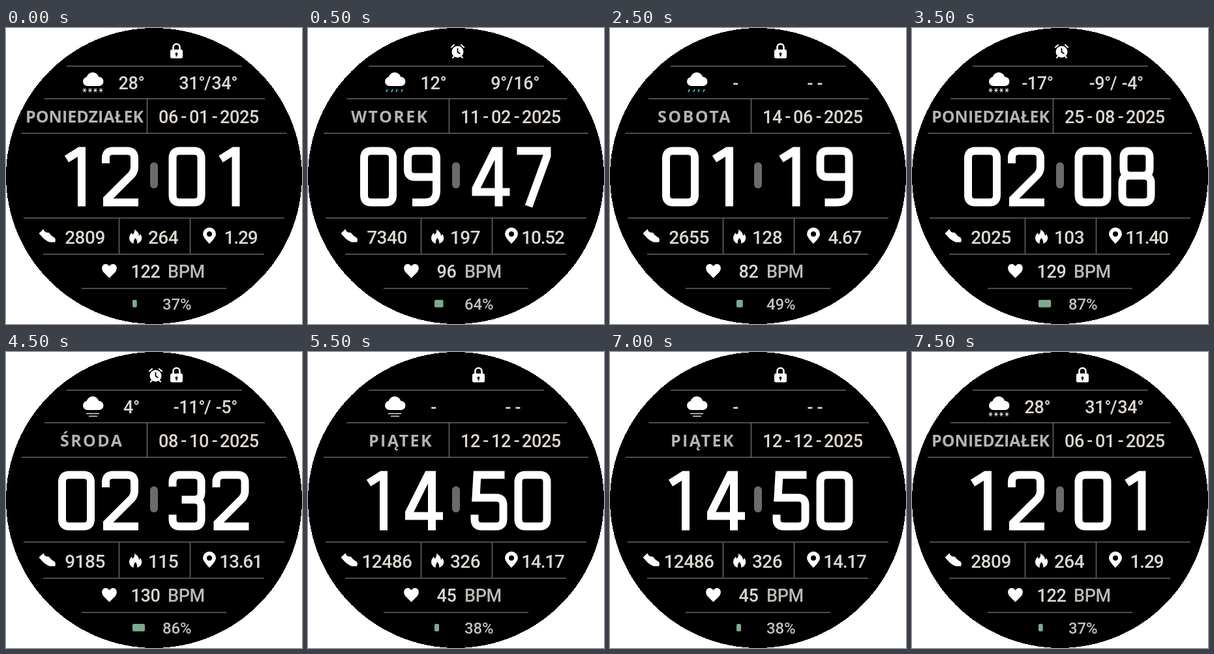
Write an HTML page that moves like this. It is 454 px wide and 454 px high and loops after 8000 ms.

```html
<!DOCTYPE html>
<html lang="pl">
<head>
<meta charset="utf-8">
<title>Watch face</title>
<style>
html, body { margin: 0; width: 100%; height: 100%; overflow: hidden; background: #fff; }
svg { display: block; width: 100vw; height: 100vh; }
text { font: 450 27px Roboto, sans-serif; letter-spacing: -.4px; fill: #ddd8d1; white-space: pre; }
#day { font: 700 25px "Open Sans", sans-serif; fill: #b4b4b4; }
.stat text { font-size: 28px; letter-spacing: -.5px; }
.stat #dist { letter-spacing: -1.2px; }
#unit { fill: #bdb9b4; }
#pct { font-size: 24px; letter-spacing: -.2px; fill: #c4c0bb; }
.mid { text-anchor: middle; }
.end { text-anchor: end; }
.icon { fill: #fff; }
.rules { fill: none; stroke: #666; stroke-width: 1.5; }
#clock { fill: none; stroke: #fff; stroke-width: 12; }
.dots { fill: url(#dots); stroke: #fff; stroke-dasharray: 1 1; mix-blend-mode: difference; }
</style>
</head>
<body>
<svg viewBox="0 0 454 454">
  <defs>
    <pattern id="dots" width="8" height="4" patternUnits="userSpaceOnUse">
      <path d="M1 1h1v1h-1zM5 3h1v1h-1z" fill="#fff"/>
    </pattern>
    <linearGradient id="warm" x1="0" y1="0" x2=".6" y2="1">
      <stop offset="0" stop-color="#f4452c"/>
      <stop offset="1" stop-color="#ff7a12"/>
    </linearGradient>
    <g id="cloud">
      <circle cx="125" cy="82" r="7"/><circle cx="133" cy="77.500" r="9.500"/>
      <circle cx="142.500" cy="82" r="7"/><path d="M125 78h17v11h-17z"/>
    </g>
    <g id="hand">
      <circle r="12" fill="#fbcfcb"/>
      <circle r="8.500" fill="#fde6e4" stroke="#ef8f89" stroke-width="1.600"/>
      <path d="M-5 1Q-5-5 0-5Q4-5 5 0L9 13Q13 9 17 13Q20 10 24 14Q28 12 30 18L34 30Q36 36 31 38L15 46Q11 47 8 42Q3 36-5 32Q-12 28-9 24Q-5 21 3 26Z"
        fill="#fff" stroke="url(#warm)" stroke-width="3.200" stroke-linejoin="round"/>
      <circle r="5" fill="#f6a19b"/>
    </g>
  </defs>

  <circle cx="227" cy="227" r="227" shape-rendering="crispEdges"/>
  <path class="rules" d="M93 58.500H362M59 108.500H397M24 161.500H430M27 291.500H427M57 347H396M116 399.500H338M216.500 108V161M173.500 291V346M282.500 291V346"/>

  <g class="icon">
    <circle id="link" cx="195" cy="36" r="10"/>
    <g id="alarm">
      <circle cx="229.500" cy="36.500" r="9"/>
      <path d="M220 29.500l4-3.500M239 29.500l-4-3.500M223.500 44l-1.500 1.500M235.500 44l1.500 1.500" stroke="#fff" stroke-width="2.200" stroke-linecap="round"/>
      <path d="M229.500 31V37L233.500 39.500" fill="none" stroke="#000" stroke-width="1.800"/>
    </g>
    <g id="lock">
      <rect x="252" y="33" width="19" height="13.500" rx="2.500"/>
      <path d="M256.500 34V29.500a5 5 0 0 1 10 0V34" fill="none" stroke="#fff" stroke-width="2.600"/>
      <path d="M261.500 37.500a2 2 0 0 1 1 3.700V43.500h-2V41.200a2 2 0 0 1 1-3.700Z" fill="#000"/>
    </g>
  </g>

  <g class="icon">
    <g id="snow"><use href="#cloud"/><path id="flakes" stroke="#ddd" stroke-width="1.100"/></g>
    <g id="rain"><use href="#cloud"/><path d="M122 94l-2 4M130 94l-2 4M137 94l-2 4M145 94l-2 4" stroke="#4fb4cf" stroke-width="1.800"/></g>
    <g id="fog"><use href="#cloud"/><path d="M123 94.500h20M127 98.500h13" stroke="#ddd" stroke-width="1.500"/></g>
    <g id="haze" fill="#aaa"></g>
  </g>

  <text id="temp" class="mid" x="192.500" y="94"></text>
  <text id="low" class="end" x="305" y="94"></text>
  <text id="slash" x="304" y="94">/</text>
  <text id="high" class="end" x="355" y="94"></text>

  <text id="day" y="145"></text>
  <text id="date" class="mid" x="249" y="146"></text>
  <text class="mid" x="272.500" y="145">-</text>
  <text id="month" class="mid" x="296" y="146"></text>
  <text class="mid" x="320" y="145">-</text>
  <text x="328" y="146">2025</text>

  <g id="clock" role="img"></g>
  <rect x="221" y="206" width="12" height="40" rx="6" fill="#6b6b6b"/>

  <g class="icon">
    <path d="M50.500 315L57.500 308.500Q59 313 62 313.500L66 314Q69 319 74.500 321.500Q77 325 75 328.500H67Q60 326 55 320Z"/>
    <path d="M52 318.500Q60 327 67 330" fill="none" stroke="#000" stroke-width="1"/>
    <path d="M197 309Q204 313 204 319L206 316Q209 320 208 324Q206 331 198 331Q190 330 189 323Q189 317 193 314L194 317Q198 314 197 309Z"/>
    <path d="M198.500 322Q202 326 201 331H196Q195 326 198.500 322Z" fill="#000"/>
    <path d="M312 331Q302 321 302 316A10 10 0 0 1 322 316Q322 321 312 331Z"/>
    <circle cx="312" cy="316" r="4" fill="#000"/>
    <path d="M158.500 383.500L149 374Q145 367 149.500 363Q155 360 158.500 365.500Q162 360 167.500 363Q172 367 168 374Z"/>
  </g>
  <g class="stat">
    <text id="steps" class="mid" x="121" y="330.500"></text>
    <text id="kcal" class="mid" x="241" y="330.500"></text>
    <text id="dist" class="mid" x="360" y="330.500"></text>
  </g>
  <text id="bpm" class="mid" y="383"></text>
  <text id="unit" y="383">BPM</text>
  <rect id="level" x="194" y="417" height="11.500" rx="2" fill="#7bab8d"/>
  <text id="pct" x="240" y="432"></text>

  <g id="zones"></g>
</svg>
<script>
const $ = id => document.getElementById(id);
const LOOP = 8000, STEP = 500;

// name, left edge
const DAYS = [["PONIEDZIAŁEK", 30], ["WTOREK", 66], ["ŚRODA", 83], ["CZWARTEK", 44],
  ["PIĄTEK", 93], ["SOBOTA", 73], ["NIEDZIELA", 48]];

// weekday, date, time, status icons, weather, temperatures, steps, kcal, km, pulse, battery
const ROWS = `0 06-01 1201 L snow 28 31 34 2809 264 1.29 122 37
1 11-02 0947 A rain 12 9 16 7340 197 10.52 96 64
2 19-03 2036 A fog 7 -2 11 4518 341 6.83 117 52
3 10-04 1523 BAL haze - - - 8920 283 3.36 142 29
4 16-05 1805 BA snow -4 -8 2 6172 152 12.74 88 71
5 14-06 0119 L rain - - - 2655 128 4.67 82 49
6 20-07 2148 L fog 19 14 23 5036 219 10.98 105 93
0 25-08 0208 A snow -17 -9 -4 2025 103 11.40 129 87
1 16-09 1054 AL rain 15 8 17 3794 236 12.25 74 45
2 08-10 0232 AL fog 4 -11 -5 9185 115 13.61 130 86
3 13-11 1927 BL snow -6 -10 1 6427 308 9.42 111 58
4 12-12 1450 L fog - - - 12486 326 14.17 45 38`.split("\n").map(r => r.split(" "));

// stroked numerals in a 56 x 91 cell
const NUMERALS = [
  "M17 6h22q11 0 11 11v57q0 11-11 11H17q-11 0-11-11V17q0-11 11-11Z",
  "M13 18.500L33 6H36V91",
  "M6 25V17q0-11 11-11h22q11 0 11 11v14q0 6-4 11L8 80V85H56",
  "M6 24V17q0-11 11-11h22q11 0 11 11v16q0 11-11 11H20M39 44q11 0 11 11v19q0 11-11 11H17q-11 0-11-11V67",
  "M43 91V6H37L8 64V69H60",
  "M52 6H10L8 41H39q11 0 11 11v22q0 11-11 11H17q-11 0-11-11V67",
  "M6 45H39q11 0 11 11v18q0 11-11 11H17q-11 0-11-11V24q0-18 18-18H40",
  "M4 6H50V14L22 91",
  "M18 6h20q10 0 10 10v17q0 11-11 11H19q-11 0-11-11V16q0-10 10-10ZM17 44h22q11 0 11 11v19q0 11-11 11H17q-11 0-11-11V55q0-11 11-11Z",
  "M50 46H17q-11 0-11-11V17q0-11 11-11h22q11 0 11 11v50q0 18-18 18H13"
];
const CELLS = [80, 147, 249.5, 316.5];

// tap zones: x, y, width, height, finger x, finger y
const ZONES = [
  [109, 59, 94, 46, 162, 86], [255, 109, 112, 51, 318, 139],
  [71, 180, 94, 94, 124, 231], [243, 180, 95, 94, 297, 231], [384, 199, 60, 60, 421, 231],
  [71, 293, 94, 52, 124, 322], [184, 293, 84, 52, 232, 322],
  [176, 350, 90, 51, 225, 379], [189, 407, 94, 46, 243, 435]
];

const show = (id, on) => $(id).setAttribute("display", on ? "inline" : "none");
const put = (id, value) => { $(id).textContent = value; };
const degrees = v => v === "-" ? "-" : v + "°";

function build() {
  $("flakes").setAttribute("d", [120.5, 129, 137, 145.5].map(x =>
    `M${x - 3} 95.500h6M${x - 1.7} 92.500l3.400 6M${x + 1.7} 92.500l-3.400 6`).join(""));

  let haze = "";
  for (let r = -3; r <= 3; r++)
    for (let c = 0; c < 7 - Math.abs(r); c++)
      haze += `<circle cx="${134 + r * 4.6}" cy="${84 + (c - (6 - Math.abs(r)) / 2) * 5}" r=".8"/>`;
  $("haze").innerHTML = haze;

  $("clock").innerHTML = CELLS.map(x => `<path transform="translate(${x} 182.500)"/>`).join("");
  $("zones").innerHTML = ZONES.map(([x, y, w, h, fx, fy]) =>
    `<rect class="dots" x="${x + .5}" y="${y + .5}" width="${w}" height="${h}"/>` +
    `<use href="#hand" x="${fx}" y="${fy}"/>`).join("");
}

function render(row) {
  const [day, date, time, status, sky, temp, low, high, steps, kcal, dist, bpm, pct] = row;
  const [name, left] = DAYS[day];
  put("day", name);
  $("day").setAttribute("x", left);
  $("day").style.letterSpacing = name.length > 10 ? "0" : "2.4px";
  put("date", date.slice(0, 2));
  put("month", date.slice(3));

  [...$("clock").children].forEach((p, i) => p.setAttribute("d", NUMERALS[time[i]]));
  $("clock").setAttribute("aria-label", time.slice(0, 2) + ":" + time.slice(2));

  show("link", status.includes("B"));
  show("alarm", status.includes("A"));
  show("lock", status.includes("L"));
  for (const id of ["snow", "rain", "fog", "haze"]) show(id, id === sky);

  const empty = low === "-";
  put("temp", degrees(temp));
  put("low", degrees(low));
  put("high", degrees(high));
  show("slash", !empty);
  $("low").setAttribute("x", empty ? 311 : 305);
  $("high").setAttribute("x", empty ? 326 : 355);

  put("steps", steps);
  put("kcal", kcal);
  put("dist", dist);
  put("bpm", bpm);
  $("bpm").setAttribute("x", bpm.length > 2 ? 214 : 212.5);
  $("unit").setAttribute("x", bpm.length > 2 ? 248 : 240);
  put("pct", pct + "%");
  $("level").setAttribute("width", pct * .25 - 2.5);
}

let shown = -1;
function draw(now) {
  const t = (now - start) % LOOP;
  const i = t < 7500 ? Math.min(Math.floor(t / STEP), ROWS.length - 1) : 0;
  if (i !== shown) render(ROWS[shown = i]);
  show("zones", t >= 6000 && t < 7000);
}

function tick() {
  draw(performance.now());
  requestAnimationFrame(tick);
}

build();
const start = performance.now();
tick();
</script>
</body>
</html>
```
